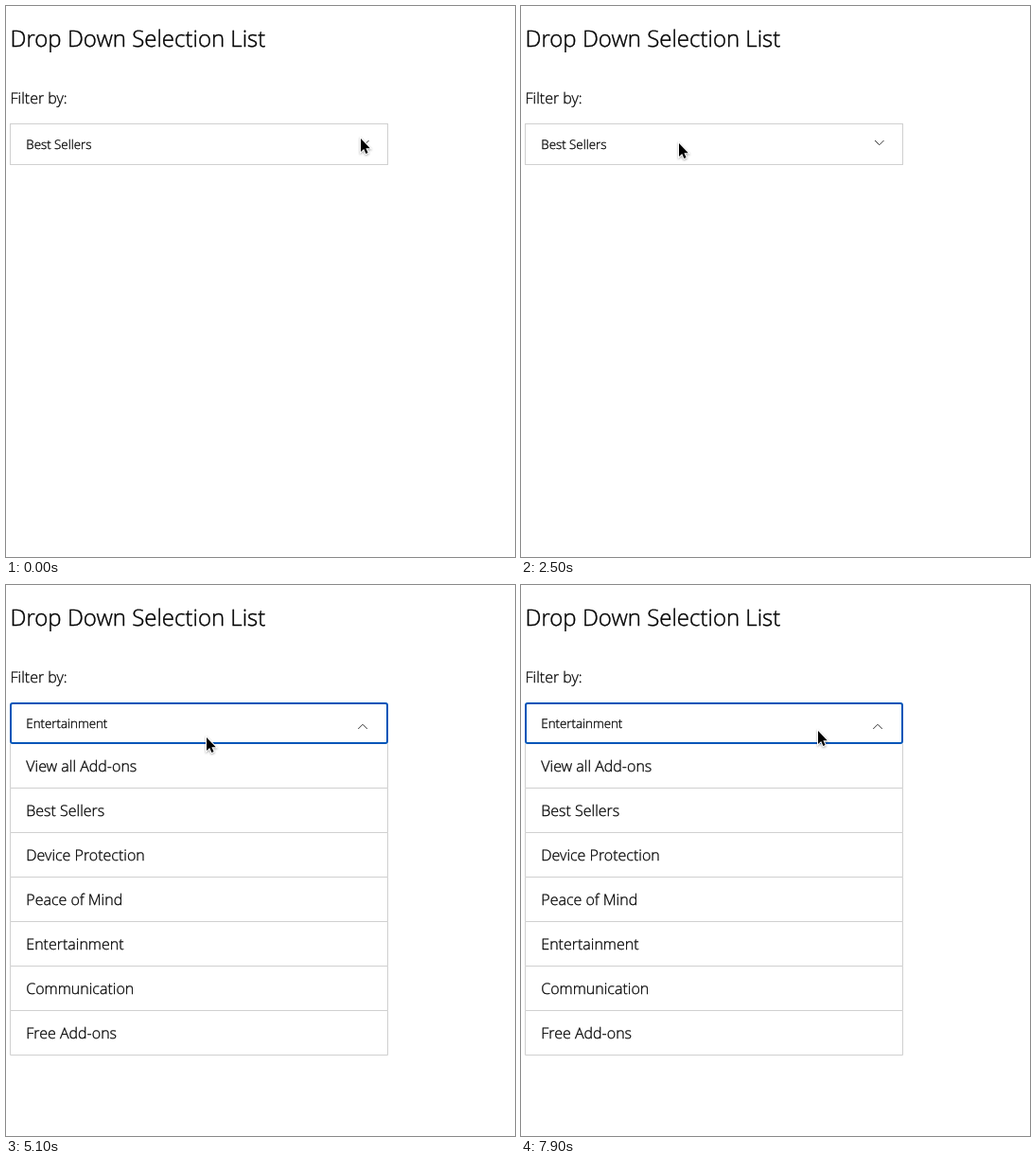
An HTML page that plays this animation: 538 by 582 pixels, repeating every 8 s.

```html
<!DOCTYPE html>
<html lang="en">
<head>
<meta charset="utf-8">
<title>Drop Down Selection List</title>
<style>
  html, body { margin: 0; width: 100%; height: 100%; overflow: hidden; background: #fff; }
  svg { display: block; }
  text {
    font: 300 16px "Open Sans", sans-serif;
    text-rendering: geometricPrecision;
    stroke: #000; stroke-width: .3;
  }
  .title { font-size: 24px; stroke-width: .4; }
  .value { font-size: 13.333px; }
  .line { fill: none; stroke: #d0d0d0; }
  .focus { fill: none; stroke: #0055b8; stroke-width: 2; }
  .chevron { fill: none; stroke: #333; }
  .arrow {
    stroke: #fff; stroke-width: 2; paint-order: stroke;
    filter: drop-shadow(0 1.5px 1px rgba(0, 0, 0, .35));
  }
</style>
</head>
<body>
<svg width="538" height="582" viewBox="0 0 538 582">
  <text class="title" x="4.5" y="43">Drop Down Selection List</text>
  <text x="4.5" y="103">Filter by:</text>
  <text class="value" id="value" x="21.3" y="151"></text>
  <g id="closed">
    <rect class="line" x="4.5" y="124.5" width="399" height="43"/>
    <path class="chevron" d="M374 142l4.75 4.75 4.75-4.75"/>
  </g>
  <g id="open">
    <g id="list"></g>
    <rect class="focus" x="5" y="125" width="398" height="42" rx="2"/>
    <path class="chevron" d="M372.25 152l4.75-4.75 4.75 4.75"/>
  </g>
  <path class="arrow" id="cursor" d="M0 0V14L3.2 11 5.4 16 7.6 15 5.4 10.2H9.8Z"/>
</svg>
<script>
const $ = id => document.getElementById(id);
const LOOP = 8000, STEP = 100, TRAVEL = 500;
const items = ["View all Add-ons", "Best Sellers", "Device Protection", "Peace of Mind",
  "Entertainment", "Communication", "Free Add-ons"];

// Each click opens or closes the list; the fourth one picks an item
const clicks = [300, 2400, 3000, 4100, 5000, 6500, 7500];

// Cursor rests: arrival time, x, y
const rests = [
  [0, 375, 140], [1100, 145, 193], [2300, 167, 145], [3700, 109, 381],
  [4900, 212, 161], [5700, 472, 222], [7300, 314, 154]
];

$("list").innerHTML = items.map((name, i) => {
  const y = 167.5 + 47 * i;
  return `<text x="21.3" y="${y + 29.5}">${name}</text>` +
    `<path class="line" d="M4.5 ${y}V${y + 47}H403.5V${y}"/>`;
}).join("");

const clamp = p => Math.max(0, Math.min(1, p));
const ease = p => p * p * (3 - 2 * p);

function cursorAt(t) {
  let [, x, y] = rests[0];
  for (const [arrival, nextX, nextY] of rests.slice(1)) {
    const p = ease(clamp((t - arrival) / TRAVEL + 1));
    x += (nextX - x) * p;
    y += (nextY - y) * p;
  }
  return [x, y];
}

function draw(now) {
  const t = Math.floor(now % LOOP / STEP) * STEP;
  const count = clicks.filter(c => c <= t).length;
  const isOpen = count % 2 === 1;
  $("open").style.display = isOpen ? "" : "none";
  $("closed").style.display = isOpen ? "none" : "";
  $("value").textContent = items[count < 4 ? 1 : 4];
  $("cursor").setAttribute("transform", `translate(${cursorAt(t)})`);
}

const start = performance.now();
function frame() {
  draw(performance.now() - start);
  requestAnimationFrame(frame);
}
frame();
</script>
</body>
</html>
```
